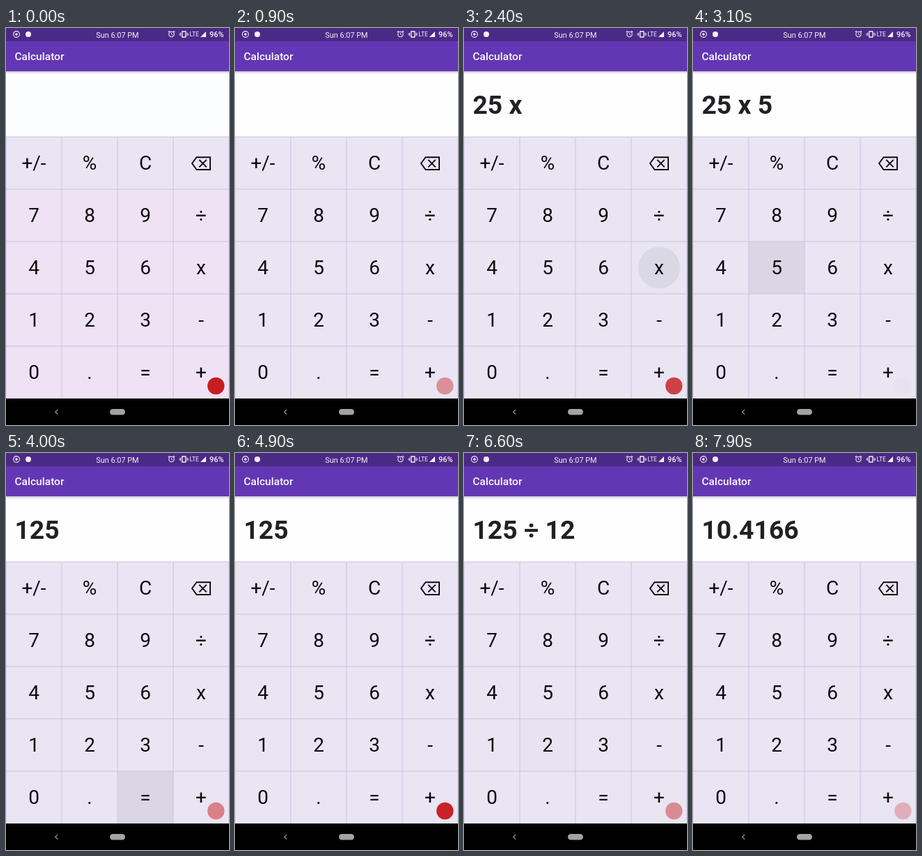
Recreate the animation shown at these times as an HTML page with a canvas. Size 320x569 px, loop 8 s.

```html
<!DOCTYPE html>
<html lang="en">
<head>
<meta charset="utf-8">
<title>Calculator</title>
<style>
html, body { margin: 0; width: 100%; height: 100%; overflow: hidden; background: #000; }
canvas { display: block; width: 320px; height: 569px; }
</style>
</head>
<body>
<canvas id="stage"></canvas>
<script>
const W = 320, H = 569, LOOP = 8000;
const GRID_TOP = 156, CELL_W = 80, CELL_H = 75;
const FONT = 'Roboto, "Open Sans", sans-serif';

const canvas = document.getElementById('stage');
const ctx = canvas.getContext('2d');
const dpr = window.devicePixelRatio || 1;
canvas.width = Math.round(W * dpr);
canvas.height = Math.round(H * dpr);

const keys = [
  ['+/-', '%', 'C', ''],
  ['7', '8', '9', '÷'],
  ['4', '5', '6', 'x'],
  ['1', '2', '3', '-'],
  ['0', '.', '=', '+']
];

// Each tap: start time, column, row, display after the tap
const taps = [
  { at: 1000, col: 1, row: 3, shows: '2' },
  { at: 1250, col: 1, row: 2, shows: '25' },
  { at: 2150, col: 3, row: 2, shows: '25 x', radius: 30 },
  { at: 2960, col: 1, row: 2, shows: '25 x 5' },
  { at: 3900, col: 2, row: 4, shows: '125' },
  { at: 5250, col: 3, row: 1, shows: '125 ÷' },
  { at: 6000, col: 0, row: 3, shows: '125 ÷ 1' },
  { at: 6200, col: 1, row: 3, shows: '125 ÷ 12' },
  { at: 7400, col: 2, row: 4, shows: '10.4166' }
];

// Turning points of the recording dot: full, clear, full, ...
const turns = [0, 620, 1280, 1950, 2500, 3110, 3700, 4300, 4920, 5740, 6220, 6920, 7450, 8070];

const clamp = v => Math.max(0, Math.min(1, v));

function box(x, y, w, h, color) {
  ctx.fillStyle = color;
  ctx.fillRect(x, y, w, h);
}

function disc(x, y, r, color) {
  ctx.fillStyle = color;
  ctx.beginPath();
  ctx.arc(x, y, r, 0, Math.PI * 2);
  ctx.fill();
}

function ring(x, y, r, width) {
  ctx.lineWidth = width;
  ctx.beginPath();
  ctx.arc(x, y, r, 0, Math.PI * 2);
  ctx.stroke();
}

function line(points, color, width, closed) {
  ctx.strokeStyle = color;
  ctx.lineWidth = width;
  ctx.beginPath();
  points.forEach(([x, y]) => ctx.lineTo(x, y));
  if (closed) ctx.closePath();
  ctx.stroke();
}

function text(str, x, y, size, color, weight = 400, align = 'left') {
  ctx.font = `${weight} ${size}px ${FONT}`;
  ctx.textAlign = align;
  ctx.fillStyle = color;
  ctx.fillText(str, x, y);
}

function statusBar() {
  const ink = '#f4f0fa';
  box(0, 0, W, 19, '#4b2a86');
  ctx.strokeStyle = ink;
  ring(15, 9, 4.4, 1.1);
  disc(15, 9, 1.8, ink);
  disc(32, 9, 4, ink);
  text('Sun 6:07 PM', 160, 13.6, 10.9, ink, 400, 'center');

  ctx.strokeStyle = ink;
  ring(237.5, 9, 3.7, 1.1);
  line([[237.5, 6.8], [237.5, 9.2], [239.2, 10.3]], ink, 0.9);
  line([[232.8, 6], [235, 4.2]], ink, 1.1);
  line([[240, 4.2], [242.2, 6]], ink, 1.1);

  line([[252.8, 5], [257.8, 5], [257.8, 13], [252.8, 13]], ink, 1.3, true);
  line([[250.7, 6.5], [250.7, 11.5]], ink, 1);
  line([[259.9, 6.5], [259.9, 11.5]], ink, 1);
  line([[249.2, 7.6], [249.2, 10.4]], ink, 0.9);
  line([[261.4, 7.6], [261.4, 10.4]], ink, 0.9);

  text('LTE', 263.6, 12.4, 8.5, ink);
  ctx.fillStyle = ink;
  ctx.beginPath();
  ctx.moveTo(279, 13);
  ctx.lineTo(287, 13);
  ctx.lineTo(287, 5);
  ctx.fill();
  text('96%', 292, 13.2, 11, ink, 500);
}

function header() {
  box(0, 19, W, 43, '#6337b3');
  text('Calculator', 12.4, 46.4, 15.56, '#fbf9ff', 500);
}

function display(t, warm) {
  box(0, 62, W, GRID_TOP - 62, warm > 0.5 ? '#fbfdfe' : '#fefdff');
  const shade = ctx.createLinearGradient(0, 62, 0, 66);
  shade.addColorStop(0, 'rgba(40,30,60,0.24)');
  shade.addColorStop(1, 'rgba(40,30,60,0)');
  box(0, 62, W, 4, shade);
  const last = taps.filter(tap => t >= tap.at + 100).pop();
  if (last) text(last.shows, 12.4, 122.5, 37.33, '#212022', 700);
}

function ripple(tap, t) {
  const age = t - tap.at;
  if (age < 0 || age > 430) return;
  const strength = Math.min(clamp(age / 80), clamp((430 - age) / 200));
  const x = tap.col * CELL_W, y = GRID_TOP + tap.row * CELL_H;
  const color = `rgba(0,0,0,${0.067 * strength})`;
  if (tap.radius) disc(x + 40, y + 37.5, tap.radius * clamp(age / 200), color);
  else box(x, y, CELL_W, CELL_H, color);
}

function backspace() {
  const ink = '#0c0b0e';
  ctx.lineJoin = 'miter';
  line([[267, 194], [273.5, 185.2], [293, 185.2], [293, 203], [273.5, 203]], ink, 1.9, true);
  line([[277.3, 188.8], [287.7, 199.4]], ink, 1.9);
  line([[287.7, 188.8], [277.3, 199.4]], ink, 1.9);
}

function keypad(t, warm) {
  box(0, GRID_TOP, W, 375, '#e9e5f3');
  if (warm > 0) {
    box(0, GRID_TOP + CELL_H, W, 300, `rgba(238,226,244,${warm})`);
  }
  taps.forEach(tap => ripple(tap, t));
  const rule = '#c9c3e4';
  for (let i = 0; i <= 4; i++) box(i * CELL_W - 0.5, GRID_TOP, 1, 375, rule);
  for (let i = 0; i <= 4; i++) box(0, GRID_TOP + i * CELL_H - 0.5, W, 1, rule);
  keys.forEach((row, r) => row.forEach((label, c) => {
    text(label, c * CELL_W + 40, GRID_TOP + r * CELL_H + 47.2, 28, '#0c0b0e', 400, 'center');
  }));
  backspace();
}

function navBar() {
  box(0, 531, W, 38, '#000');
  line([[74.2, 546.8], [70.8, 550.2], [74.2, 553.6]], '#a3a3a3', 1.2);
  ctx.fillStyle = '#a3a3a3';
  ctx.beginPath();
  ctx.roundRect(149, 546, 22, 8.5, 4.25);
  ctx.fill();
}

function dotAlpha(t) {
  const i = turns.findIndex(v => v > t) - 1;
  const p = (t - turns[i]) / (turns[i + 1] - turns[i]);
  return i % 2 ? p : 1 - p;
}

function draw(t) {
  ctx.setTransform(dpr, 0, 0, dpr, 0, 0);
  const warm = clamp(1 - (t - 100) / 300);
  statusBar();
  header();
  display(t, warm);
  keypad(t, warm);
  navBar();
  disc(301.3, 513, 12.2, `rgba(199,28,32,${dotAlpha(t)})`);
}

const start = performance.now();
function tick() {
  draw((performance.now() - start) % LOOP);
  requestAnimationFrame(tick);
}
tick();
</script>
</body>
</html>
```
